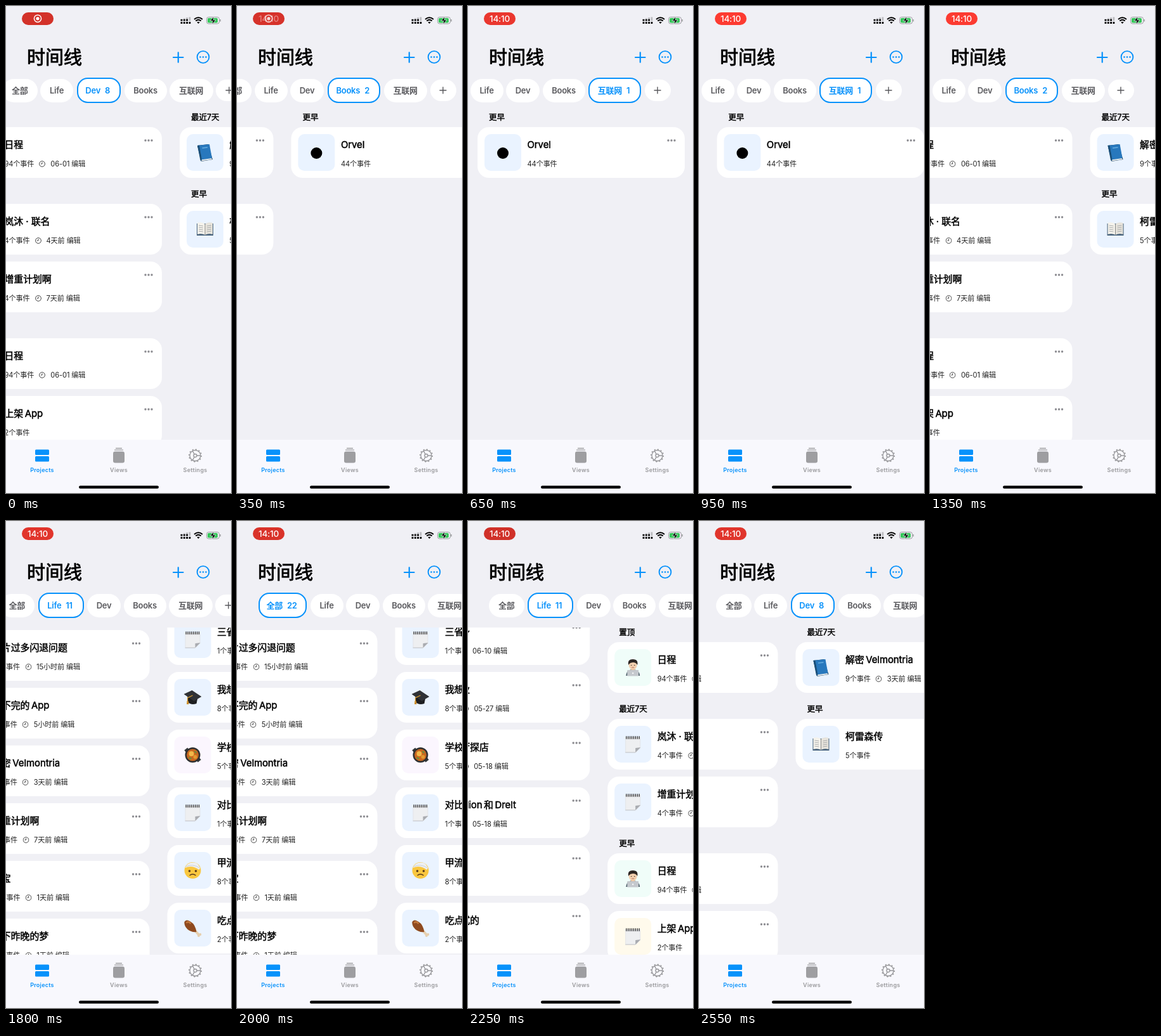
Write an HTML page that moves like this. It is 355 by 768 pixels and loops after 2.6 s.

```html
<!DOCTYPE html>
<html lang="zh-CN">
<head>
<meta charset="utf-8">
<title>时间线</title>
<style>
html, body { margin: 0; width: 100%; height: 100%; overflow: hidden; background: #f0f0f5; }
body { font-family: Inter, "Noto Sans CJK SC", "Noto Sans CJK", sans-serif; color: #000; }
#stage { position: relative; width: 355px; height: 768px; overflow: hidden; background: #f0f0f5; }
#stage div, #top, #bar svg, .tab, .card * { position: absolute; white-space: nowrap; }
#top { left: 0; top: 0; }
h1 { position: absolute; margin: 0; left: 33px; top: 61.5px; font: 400 29px/40px Inter, "Noto Sans CJK SC", "Noto Sans CJK", sans-serif; -webkit-text-stroke: .9px; }
#pill { left: 25px; top: 10px; width: 50px; height: 19.5px; border-radius: 10px; }
#clock { left: 25px; top: 10px; width: 50px; font: 500 13.5px/20px Inter, sans-serif; letter-spacing: -.2px; text-align: center; color: #fff; }
#list { left: 0; top: 168px; width: 355px; height: 600px; overflow: hidden; }
.page { top: -168px; left: 0; width: 355px; height: 1px; }
.head { left: 33px; font-weight: 400; font-size: 12.5px; line-height: 20px; -webkit-text-stroke: .45px; }
.card { left: 14.5px; width: 327px; height: 80px; border-radius: 18px; background: #fff; }
.tile { left: 11px; top: 11px; width: 58px; height: 58px; border-radius: 10px; }
.tile svg { left: 15px; top: 15px; width: 28px; height: 28px; }
.name { left: 79px; top: 18px; font-weight: 400; font-size: 14.9px; line-height: 20px; letter-spacing: -.05px; -webkit-text-stroke: .5px; }
.info { left: 79px; top: 50px; display: flex; align-items: center; gap: 8px; font-size: 11.1px; line-height: 16px; letter-spacing: -.1px; color: #222; }
.info * { position: static; }
.more { left: 298px; top: 18px; }
.chip { height: 37px; top: 114.5px; box-sizing: border-box; border-radius: 18.5px; background: #fff; color: #5a5a5e;
  display: flex; align-items: center; justify-content: center; gap: 7px; font-weight: 600; font-size: 13px; line-height: 16px; letter-spacing: -.25px; }
.chip.on { top: 113px; height: 39.5px; border: 2px solid #0892fb; border-radius: 17px; color: #0892fb; padding-right: 3px; }
.chip b { display: none; font-weight: 600; }
.chip.on b { display: inline; }
.chip.add { top: 116px; height: 34px; }
#bar { left: 0; top: 684px; width: 355px; height: 84px; background: #f8f8fd; }
.tab { top: 41px; width: 80px; text-align: center; font-weight: 600; font-size: 9px; line-height: 14px; letter-spacing: .25px; color: #9a9a9d; }
</style>
</head>
<body>
<svg width="0" height="0" style="position:absolute">
  <symbol id="book" viewBox="0 0 28 28">
    <path d="M2 3 19 1 26 25 8 28Z" fill="#173b59"/><path d="M7 25 24 22 25 25 8 27.500Z" fill="#e3e8ea"/>
    <path d="M2 3 21 1 25 23 7 25.500Z" fill="#2878bd"/><path d="M2 3 5 2.700 9 25 8 28 6.500 26Z" fill="#1b4f78"/>
    <path d="M9.500 7 18 6" stroke="#66aee0" stroke-width="1.500"/>
  </symbol>
  <symbol id="open" viewBox="0 0 28 28">
    <path d="M1 5H27V24H1Z" fill="#46617a"/><path d="M2 4Q10 2 14 6V23Q9 20 2 22Z" fill="#f5f3ec"/>
    <path d="M26 4Q18 2 14 6V23Q19 20 26 22Z" fill="#e7e4dc"/>
    <path d="M4 8 11 9M4 11 11 12M4 14 11 15M4 17 11 18M17 9 24 8M17 12 24 11M17 15 24 14M17 18 24 17" stroke="#a3a5a6" stroke-width=".9"/>
    <path d="M14 6V23" stroke="#777" stroke-width=".8"/>
  </symbol>
  <symbol id="note" viewBox="0 0 28 28">
    <path d="M2 3H26V20L19 27H2Z" fill="#e3e4e7"/><path d="M3 7H25V19L18 26H3Z" fill="#eeeff1"/>
    <path d="M26 19 18 27V20Z" fill="#a9abb0"/><path d="M2 27H18" stroke="#c3c4c8"/>
    <path d="M3 3.500H26" stroke="#333" stroke-width="4.500" stroke-dasharray="1.300 1.600"/>
  </symbol>
  <symbol id="cap" viewBox="0 0 28 28">
    <path d="M6 12V21Q11 27 20 24L22 14Z" fill="#1d1e21"/><path d="M0 9 13 3 28 13 16 20Z" fill="#303236"/>
    <path d="M14 11 6 15V22" fill="none" stroke="#d99b2b" stroke-width="1.300"/><path d="M5 20H7.500L8 25H4.500Z" fill="#c98a26"/>
  </symbol>
  <symbol id="pan" viewBox="0 0 28 28">
    <path d="M2 8 7 4M21 24 26 20" stroke="#33373a" stroke-width="4"/>
    <circle cx="14" cy="14" r="12" fill="#2f3031"/><circle cx="14" cy="14" r="9.500" fill="#c9661f"/>
    <circle cx="12" cy="12" r="4" fill="#f2b94a"/><circle cx="18" cy="17" r="3" fill="#e39a30"/>
    <path d="M8 18 12 20M17 8 20 11" stroke="#63913c" stroke-width="2"/>
  </symbol>
  <symbol id="face" viewBox="0 0 28 28">
    <circle cx="14" cy="14" r="13" fill="#f9c73f"/><path d="M2 10A13 13 0 0 1 22 4L26 10 24 13Q13 5 2 10Z" fill="#eef0f3"/>
    <path d="M3 8Q14 3 25 10" fill="none" stroke="#cbd0d6"/>
    <circle cx="9" cy="15" r="1.800" fill="#593a1b"/><circle cx="19" cy="15" r="1.800" fill="#593a1b"/>
    <path d="M9 22Q14 18 19 22" fill="none" stroke="#593a1b" stroke-width="1.500"/>
  </symbol>
  <symbol id="leg" viewBox="0 0 28 28">
    <path d="M17 17 24 25" stroke="#e6cfae" stroke-width="4"/><circle cx="26" cy="24" r="2" fill="#e6cfae"/><circle cx="23.500" cy="26" r="2" fill="#e6cfae"/>
    <path d="M1 4Q4-1 11 4Q18 8 20 20Q12 21 6 16Q0 10 1 4Z" fill="#8f4a1f"/><path d="M4 6Q7 2 11 7" fill="none" stroke="#c4793c" stroke-width="2.500"/>
  </symbol>
  <symbol id="coder" viewBox="0 0 28 28">
    <path d="M3 27Q4 17 14 17Q24 17 25 27Z" fill="#4c5d68"/><path d="M11 14H17V19H11Z" fill="#e3b68e"/>
    <ellipse cx="14" cy="10" rx="6.500" ry="7.500" fill="#f2cfae"/><path d="M7 10Q5 1 14 1Q23 1 21 10Q19 6 14 6Q9 6 7 10Z" fill="#2d2623"/>
    <path d="M11.500 10V11M16.500 10V11" stroke="#3c2c23" stroke-width="1.500"/><path d="M12 14H16" stroke="#b86e5b"/>
    <rect x="5" y="18" width="18" height="9.500" rx="1" fill="#c4c8cd"/><circle cx="14" cy="23" r="1.300" fill="#f3f4f5"/>
  </symbol>
  <symbol id="dot" viewBox="0 0 28 28"><circle cx="14" cy="15" r="9" fill="#000"/></symbol>
</svg>

<div id="stage">
  <div id="list"></div>
  <div id="chips"></div>
  <h1>时间线</h1>
  <div id="pill"></div>
  <div id="clock">14:10</div>
  <svg id="top" width="355" height="110">
    <g id="rec"><circle cx="50" cy="19.800" r="5.600" fill="none" stroke="#fff" stroke-width="1.500"/><circle cx="50" cy="19.800" r="2.600" fill="#fff"/></g>
    <path d="M277 23.500V20.500M281.300 23.500V19.500M285.600 23.500V18.500" stroke="#000" stroke-width="2.800" opacity=".3"/>
    <path d="M289.900 23.500V17.500" stroke="#000" stroke-width="2.800" opacity=".22"/>
    <path d="M275.600 26.500H292" stroke="#000" stroke-width="3" stroke-dasharray="2.800 1.500"/>
    <path d="M275.600 22.300H287" stroke="#000" stroke-width="2.400" stroke-dasharray="2.800 1.500"/>
    <path d="M297 21Q303.500 15.500 310 21M299.300 23.600Q303.500 20 307.700 23.600" fill="none" stroke="#000" stroke-width="2"/>
    <path d="M301.300 25.500Q303.500 23.800 305.700 25.500L303.500 28Z"/>
    <rect x="316.500" y="17.500" width="20" height="10.500" rx="3.200" fill="none" stroke="#9a9a9e"/>
    <rect x="318" y="19" width="16" height="7.500" rx="1.800" fill="#34c759"/>
    <path d="M338.200 21V24.500" stroke="#9a9a9e" stroke-width="1.400"/>
    <path d="M328 16.500 322 23.500H326L325 29 331 22H327Z" stroke="#f0f0f5" stroke-width=".7"/>
    <g stroke="#0892fb" fill="none" stroke-width="2.200" stroke-linecap="round">
      <path d="M264 81H279.500M271.750 73.250V88.750"/><circle cx="311" cy="80.500" r="9.400" stroke-width="1.900"/>
      <path d="M306.500 80.500h.01M311 80.500h.01M315.500 80.500h.01" stroke-width="2.700"/>
    </g>
  </svg>
  <div id="bar">
    <svg width="355" height="84" style="left:0;top:0">
      <path d="M47.500 17H66.500V22.500H47.500ZM47.500 27.500H66.500V33H47.500Z" fill="#0892fb" stroke="#0892fb" stroke-width="3" stroke-linejoin="round"/>
      <rect x="169" y="18.500" width="18" height="18" rx="3.200" fill="#9e9ea1"/>
      <path d="M173.500 13.500H182.500M171.500 16.200H184.500" stroke="#9e9ea1" stroke-width="1.300" stroke-linecap="round"/>
      <g fill="none" stroke="#97979a" stroke-width="1.300">
        <circle cx="298.500" cy="25" r="8.500"/><circle cx="298.500" cy="25" r="9.800" stroke-width="1.600" stroke-dasharray="2.052 3.079"/>
        <circle cx="298.500" cy="25" r="2.500"/><path d="M301 25H307M297.250 22.840 294.250 17.640M297.250 27.160 294.250 32.360"/>
      </g>
      <rect x="115" y="72.500" width="126" height="4.600" rx="2.300"/>
    </svg>
    <span class="tab" style="left:17px;color:#0892fb">Projects</span>
    <span class="tab" style="left:138px">Views</span>
    <span class="tab" style="left:258.500px">Settings</span>
  </div>
</div>

<script>
const $ = id => document.getElementById(id);
const BLUE = '#eaf3ff', MINT = '#f0fdf9', CREAM = '#fffaec', PINK = '#fbf6fe';

// Each page: top of its first row, then section heads (strings) and cards.
const pages = [
  [172,
    ['note', BLUE, '图片过多闪退问题', 12, '15小时前'],
    ['note', CREAM, '写不完的\u2009App', 8, '5小时前'],
    ['book', BLUE, '解密\u2009Velmontria', 9, '3天前'],
    ['note', BLUE, '增重计划啊', 4, '7天前'],
    ['note', BLUE, '宝宝', 14, '1天前'],
    ['note', BLUE, '记下昨晚的梦', 10, '1天前']],
  [147,
    ['note', BLUE, '三省吾身', 1, '06-10'],
    ['cap', BLUE, '我想毕业', 8, '05-27'],
    ['pan', PINK, '学校餐厅探店', 5, '05-18'],
    ['note', BLUE, '对比\u2009Vellion\u2009和\u2009Drelt', 1, '05-18'],
    ['face', BLUE, '甲流', 8],
    ['leg', BLUE, '吃点韩式的', 2]],
  [150, '置顶',
    ['coder', MINT, '日程', 94, '06-01'], '最近7天',
    ['note', BLUE, '岚沐 · 联名', 4, '4天前'],
    ['note', BLUE, '增重计划啊', 4, '7天前'], '更早',
    ['coder', MINT, '日程', 94, '06-01'],
    ['note', CREAM, '上架\u2009App', 2]],
  [150, '最近7天',
    ['book', BLUE, '解密\u2009Velmontria', 9, '3天前'], '更早',
    ['open', BLUE, '柯雷森传', 5]],
  [150, '更早', ['dot', BLUE, 'Orvel', 44]]
];

const clockIcon = '<svg width="10" height="10" fill="none" stroke="#333" stroke-width=".9"><circle cx="5" cy="5" r="4.400"/><path d="M5 2.300V5H2.800"/></svg>';
const dots = '<svg class="more" width="16" height="6" fill="#8b8b90"><circle cx="3" cy="3" r="1.700"/><circle cx="8" cy="3" r="1.700"/><circle cx="13" cy="3" r="1.700"/></svg>';

const card = (y, [icon, tint, name, n, date]) => `<div class="card" style="top:${y}px">
  <div class="tile" style="background:${tint}"><svg><use href="#${icon}"/></svg></div>
  <span class="name">${name}</span>
  <span class="info"><span>${n}个事件</span>${date ? `${clockIcon}<span>${date} 编辑</span>` : ''}</span>${dots}</div>`;

$('list').innerHTML = pages.map(([start, ...rows]) => {
  let y = start, html = '';
  for (const row of rows) {
    if (typeof row === 'string') {
      y += y > start ? 30 : 41;
      html += `<div class="head" style="top:${y - 25}px">${row}</div>`;
    } else {
      html += card(y, row);
      y += 91;
    }
  }
  return `<div class="page">${html}</div>`;
}).join('');

// label, count, plain width, selected width
const tabs = [['全部', 22, 55.5, 76], ['Life', 11, 52, 72], ['Dev', 8, 53, 69.5], ['Books', 2, 67, 83.5], ['互联网', 1, 68.5, 83]];
$('chips').innerHTML = tabs.map(([label, n]) => `<div class="chip"><span>${label}</span><b>${n}</b></div>`).join('') +
  '<div class="chip add"><svg width="12" height="12" stroke="#58585c" stroke-width="1.400"><path d="M.5 6H11.500M6 .5V11.500"/></svg></div>';
const pageEls = [...document.querySelectorAll('.page')];
const chipEls = [...document.querySelectorAll('.chip')];

// start, length, from, to
const swipes = [
  [-82, 240, 2, 3], [170, 252, 3, 4], [922, 240, 4, 3], [1208.6, 230, 3, 2], [1440, 208, 2, 1],
  [1657.7, 230, 1, 0], [1910, 230, 0, 1], [2147, 230, 1, 2], [2411.8, 240, 2, 3]
];
const chipScroll = [[0, 39], [150, 39], [250, 55], [350, 65.5], [450, 72], [550, 84], [650, 89.5], [1440, 89.5],
  [1550, 70], [1650, 48], [1800, 43.5], [1900, 18], [2000, 0], [2380, 0], [2500, 6], [2600, 6]];
const pulse = [[0, 211], [350, 214], [950, 253], [1350, 252], [1800, 225], [2250, 208], [2600, 227]];
const fade = [[250, 0], [350, .4], [500, 1]];

const clamp = x => Math.max(0, Math.min(1, x));
const smooth = u => u * u * (3 - 2 * u);
function track(keys, t) {
  let v = keys[0][1];
  for (let i = 1; i < keys.length; i++) {
    const [a, from] = keys[i - 1], [b, to] = keys[i];
    v += (to - from) * clamp((t - a) / (b - a));
  }
  return v;
}

function draw(t) {
  let pos = 2, sel = 2;
  for (const [start, len, from, to] of swipes) {
    if (t < start) break;
    const u = clamp((t - start) / len);
    pos = from + (to - from) * smooth(u);
    sel = u === 1 ? to : from;
  }
  pageEls.forEach((el, i) => el.style.transform = `translateX(${(355 * (i - pos)).toFixed(2)}px)`);

  let x = 33 - track(chipScroll, t);
  chipEls.forEach((el, i) => {
    const on = i === sel, w = i < tabs.length ? tabs[i][on ? 3 : 2] : 41;
    if (on) x += 1;
    el.classList.toggle('on', on);
    el.style.left = x + 'px';
    el.style.width = w + 'px';
    x += w + (on ? 5.5 : 4.5);
  });

  const red = track(pulse, t), shown = track(fade, t);
  $('pill').style.background = `rgb(${red},${red * .235},${red * .195})`;
  $('clock').style.opacity = shown;
  $('rec').style.opacity = shown < .5 ? 1 - shown * .5 : (1 - shown) * 1.6;
}

const begin = performance.now();
function tick() {
  const t = (performance.now() - begin) % 2600;
  draw(Math.floor(t / 50) * 50);
  requestAnimationFrame(tick);
}
draw(0);
tick();
</script>
</body>
</html>
```
